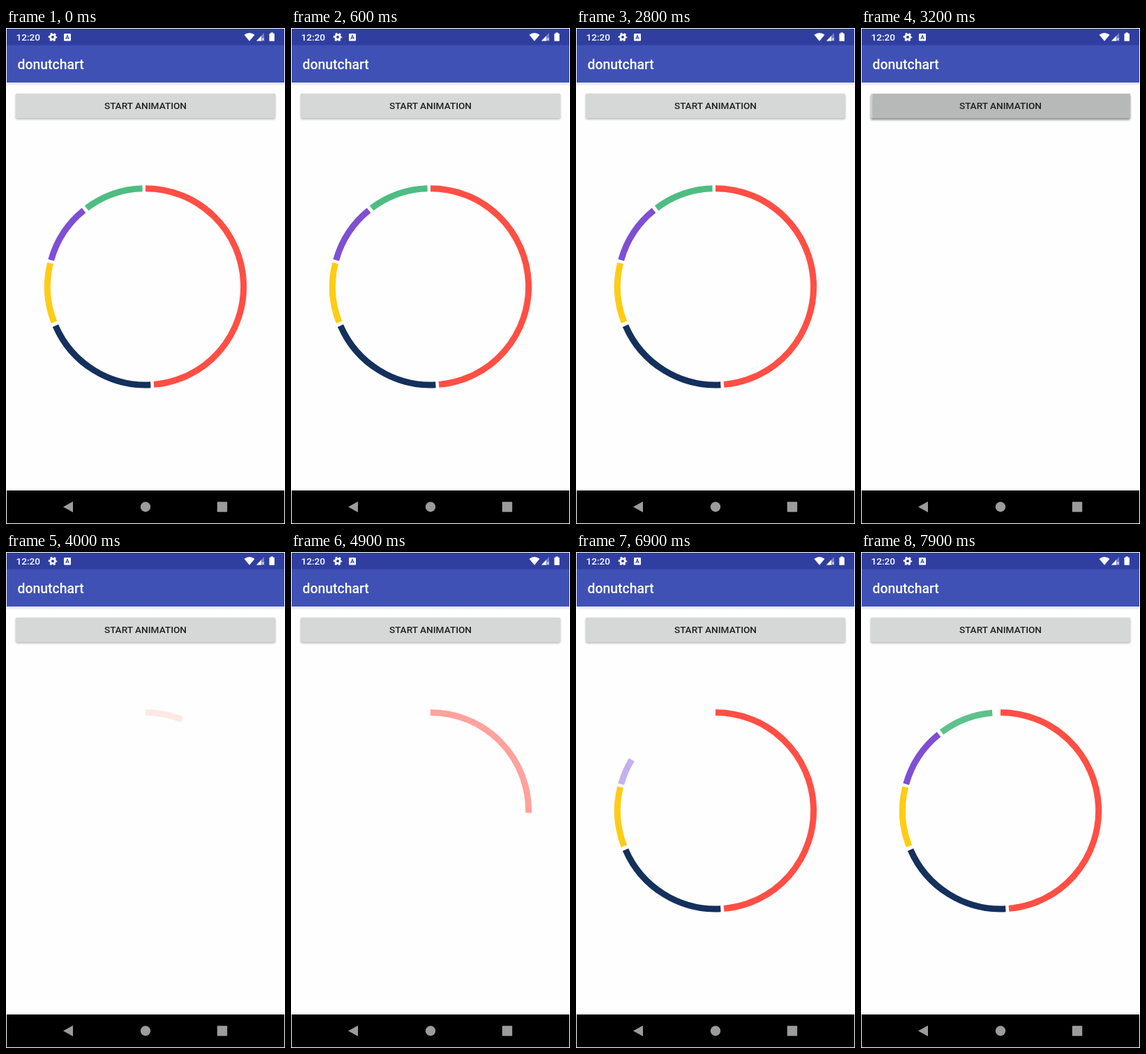
An HTML page that plays this animation: 400x710 px, repeating every 8 s.

```html
<!DOCTYPE html>
<html lang="en">
<head>
<meta charset="utf-8">
<title>donutchart</title>
<style>
html, body { margin: 0; width: 100%; height: 100%; overflow: hidden; background: #fff; }
svg { display: block; width: 400px; height: 710px; }
text { font-family: Roboto, sans-serif; font-weight: 500; }
</style>
</head>
<body>
<svg viewBox="0 0 400 710">
  <defs>
    <filter id="soft" x="-5%" y="-40%" width="110%" height="180%"><feGaussianBlur stdDeviation="1.6"/></filter>
    <clipPath id="face"><rect x="14" y="94" width="372" height="35" rx="1.5"/></clipPath>
    <linearGradient id="drop" x1="0" y1="0" x2="0" y2="1">
      <stop offset="0" stop-color="#5a6080" stop-opacity=".2"/>
      <stop offset="1" stop-color="#5a6080" stop-opacity="0"/>
    </linearGradient>
  </defs>

  <rect width="400" height="710" fill="#fff"/>
  <rect x="1" y="78" width="398" height="584" fill="#fefefe"/>
  <rect x="1" y="78" width="398" height="5" fill="url(#drop)"/>
  <rect x="1" y="24" width="398" height="54" fill="#3f51b5"/>
  <rect x="1" y="1" width="398" height="23.5" fill="#303f9f"/>
  <text x="16.5" y="59" font-size="19.4" fill="#fff">donutchart</text>

  <g fill="#fff">
    <text x="14.5" y="18" font-size="13.6">12:20</text>
    <g fill="none" stroke="#fff">
      <circle cx="67" cy="13" r="3.4" stroke-width="2.8"/>
      <circle cx="67" cy="13" r="5.4" stroke-width="1.8" stroke-dasharray="2.8 2.855" stroke-dashoffset="1.4"/>
    </g>
    <rect x="83" y="8" width="10" height="10.5" rx="1.2"/>
    <path d="M85.7 16 88 10.4 90.3 16M86.6 14.2h2.8" fill="none" stroke="#303f9f" stroke-width="1.1"/>
    <path d="M341.5 9.8Q349 4.2 356.5 9.8L349 18.8Z"/>
    <path d="M359 18.5 370 7V18.5Z" opacity=".35"/>
    <path d="M359 18.5 366 11.2V18.5Z"/>
    <path d="M367 14.3l3 3.6m0-3.6l-3 3.6" stroke="#fff" stroke-width="1"/>
    <path d="M377.5 8.6q0-.8.8-.8h1.2V6.4h3.4v1.4h1.2q.8 0 .8.8v9.3q0 .9-.8.9h-5.8q-.8 0-.8-.9Z"/>
  </g>

  <rect id="shade" x="14" y="95" width="372" height="35.5" rx="2" filter="url(#soft)"/>
  <g clip-path="url(#face)">
    <rect x="14" y="94" width="372" height="35" fill="#d6d7d7"/>
    <rect id="tint" x="14" y="94" width="372" height="35"/>
    <circle id="ripple" cx="212" cy="112"/>
  </g>
  <text x="200" y="116.3" font-size="13.6" text-anchor="middle" fill="#212121">START ANIMATION</text>

  <g id="chart" fill="none" stroke-width="9"></g>

  <rect x="1" y="662" width="398" height="47" fill="#000"/>
  <g fill="#9c9c9c">
    <path d="M82 685.5 96 677.8V693.2Z"/>
    <circle cx="200" cy="685.5" r="7.2"/>
    <rect x="302.8" y="678.3" width="14.4" height="14.4" rx="1"/>
  </g>
</svg>
<script>
const LOOP = 8000, PRESS = 2960, START = 3195, SWEEP = 5000;
const CX = 200, CY = 370.3, R = 140.6;
const $ = id => document.getElementById(id);
const clamp = x => Math.max(0, Math.min(1, x));

// colour, first angle, last angle (degrees clockwise from the top)
const slices = [
  ['#ff4f45', 0, 175.1],
  ['#14305c', 177, 246.6],
  ['#ffcc14', 248.8, 283.9],
  ['#7e4fd3', 285.7, 321],
  ['#4dbd82', 323.1, 358.2]
].map(([color, from, to]) => {
  const el = document.createElementNS('http://www.w3.org/2000/svg', 'path');
  el.setAttribute('stroke', color);
  $('chart').append(el);
  return { el, from, size: to - from };
});
const total = slices.reduce((sum, s) => sum + s.size, 0);

function point(deg) {
  const a = deg * Math.PI / 180;
  return (CX + R * Math.sin(a)).toFixed(2) + ' ' + (CY - R * Math.cos(a)).toFixed(2);
}

function drawChart(progress) {
  let left = progress * total;
  for (const { el, from, size } of slices) {
    const part = clamp(left / size);
    left -= size;
    const sweep = part * size;
    el.setAttribute('d', part > 0
      ? `M${point(from)}A${R} ${R} 0 ${sweep > 180 ? 1 : 0} 1 ${point(from + sweep)}` : '');
    el.setAttribute('opacity', part);
  }
}

function drawButton(t) {
  const grow = clamp((t - PRESS) / 250);
  const fade = 1 - clamp((t - START - 80) / 320);
  const held = grow * fade;
  $('ripple').setAttribute('r', 200 * Math.sqrt(grow));
  $('ripple').setAttribute('opacity', grow > 0 ? 0.1 * fade : 0);
  $('tint').setAttribute('opacity', 0.05 * held);
  $('shade').setAttribute('opacity', 0.3 + 0.15 * held);
  $('shade').setAttribute('y', 95 + held);
}

function draw(t) {
  const p = clamp((t - START) / SWEEP);
  drawChart(t < START ? 1 : (1 - Math.cos(Math.PI * p)) / 2);
  drawButton(t);
}

let origin;
function tick(now) {
  origin ??= now;
  draw((now - origin) % LOOP);
  requestAnimationFrame(tick);
}
draw(0);
requestAnimationFrame(tick);
</script>
</body>
</html>
```
